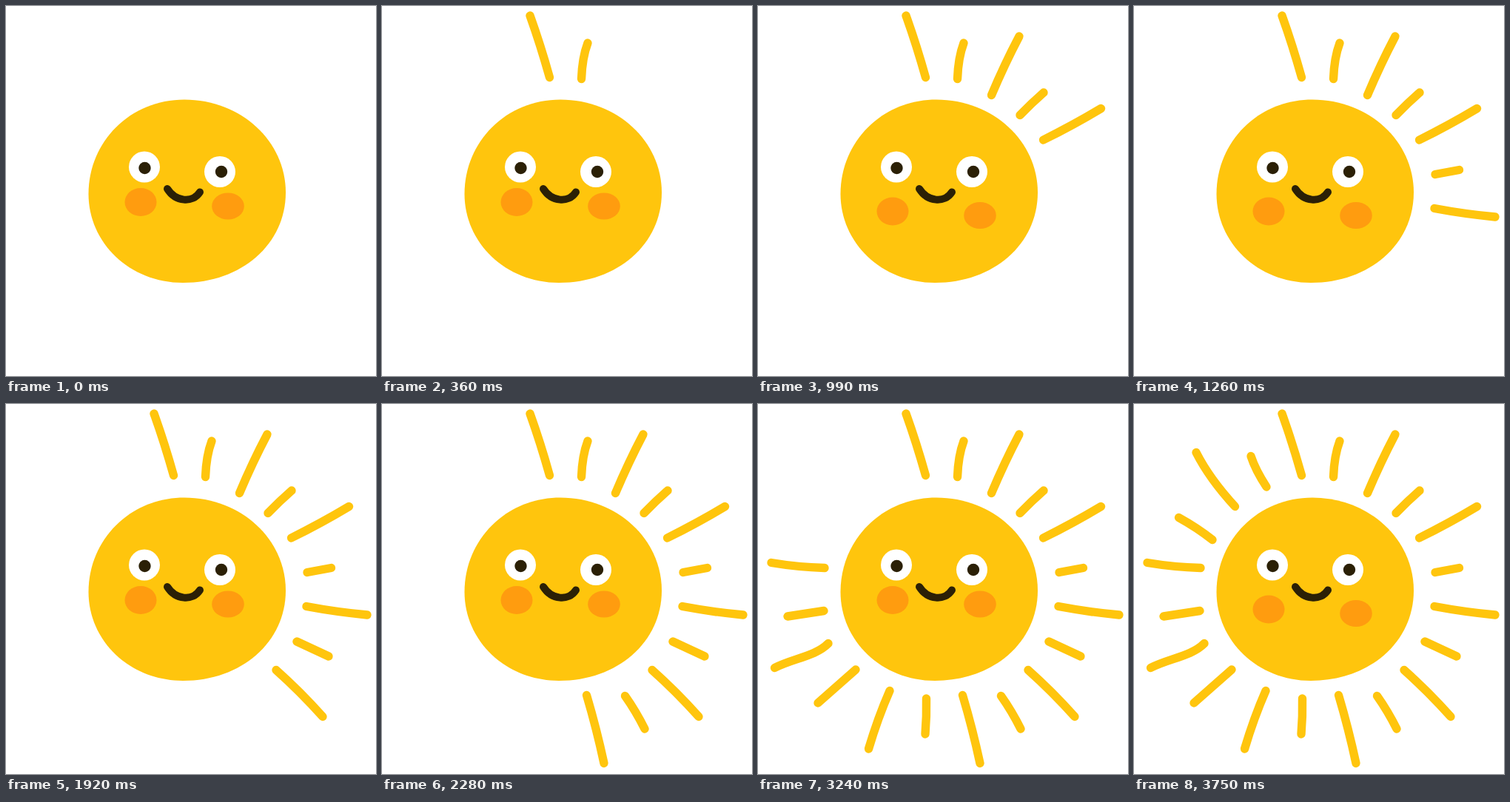
Recreate the animation shown at these times as an HTML page. Size 500x500 px, loop 3.78 s.

```html
<!DOCTYPE html>
<html lang="en">
<head>
<meta charset="utf-8">
<title>Sunshine</title>
<style>
  html, body { margin: 0; width: 100%; height: 100%; overflow: hidden; background: #fff; }
  svg { display: block; width: 100%; height: 100%; }
  .rays { fill: none; stroke: #ffc50d; stroke-width: 11.4; stroke-linecap: round; }
  .rays path { visibility: hidden; }
  .body { fill: #ffc50d; }
  .eye { fill: #fff; }
  .pupil { fill: #2b2006; }
  .mouth { fill: none; stroke: #2b2006; stroke-width: 10; stroke-linecap: round; }
  .cheeks { fill: #ff9c0f; }
</style>
</head>
<body>
<svg viewBox="0 0 500 500">
  <!-- clockwise from the top, in order of appearance -->
  <g class="rays">
    <path d="M200 13Q214 52 226.500 96.500"/>
    <path d="M278 50Q270.500 70 269.500 98.500"/>
    <path d="M353 41Q333 79 315.500 120.500"/>
    <path d="M386 117Q370 131 354 147.500"/>
    <path d="M463.500 138.500Q426 161 385.500 181"/>
    <path d="M439.500 221.500L407 227.500"/>
    <path d="M488 285Q446 281 406 273.500"/>
    <path d="M436 341L393 321"/>
    <path d="M428 422.500Q398 389 365 359.500"/>
    <path d="M355 439Q343 415 328.500 394.500"/>
    <path d="M300 485.500Q290 439 276.500 393.500"/>
    <path d="M226 446Q228 422 227.500 398"/>
    <path d="M149.500 466Q162 424 178 387.500"/>
    <path d="M81 404L132 359"/>
    <path d="M22.500 356.500C46 344 78 341 95 323.500"/>
    <path d="M40 287L89 279.500"/>
    <path d="M18 214.500Q54 220.500 90 221.500"/>
    <path d="M60.500 153.500Q85 167 106 183.500"/>
    <path d="M84 65.500Q102 101 136.500 138.500"/>
    <path d="M158 70.500Q164 89 179 112"/>
  </g>
  <path class="body" d="M241 126.500C318 126.500 378 183 378 252C378 322 318 374 239 374C167 374 111.500 320 111.500 254C111.500 183 168 126.500 241 126.500Z"/>
  <g class="cheeks">
    <ellipse cx="182" cy="265" rx="21.500" ry="19"/>
    <ellipse cx="300" cy="270.500" rx="21.800" ry="18"/>
  </g>
  <circle class="eye" cx="187" cy="217.500" r="21"/>
  <circle class="eye" cx="289" cy="224" r="21"/>
  <circle class="pupil" cx="187.500" cy="219" r="8.200"/>
  <circle class="pupil" cx="291" cy="224" r="8.200"/>
  <path class="mouth" d="M218 247C229 264.500 252 267 262 251.500"/>
</svg>
<script>
  const LOOP = 3780, BEAT = 177, PAUSE = 10, DROP = 12.5;
  const rays = document.querySelectorAll('.rays path');
  const cheeks = document.querySelector('.cheeks');
  const start = performance.now();

  // One new ray per beat, with a single beat of rest; cheeks hop every beat.
  function draw() {
    const beat = Math.floor(((performance.now() - start) % LOOP) / BEAT);
    const count = beat < PAUSE ? beat : beat - 1;
    rays.forEach((ray, i) => {
      ray.style.visibility = i < count ? 'visible' : 'hidden';
    });
    cheeks.setAttribute('transform', `translate(0 ${beat % 2 * DROP})`);
    requestAnimationFrame(draw);
  }
  draw();
</script>
</body>
</html>
```
